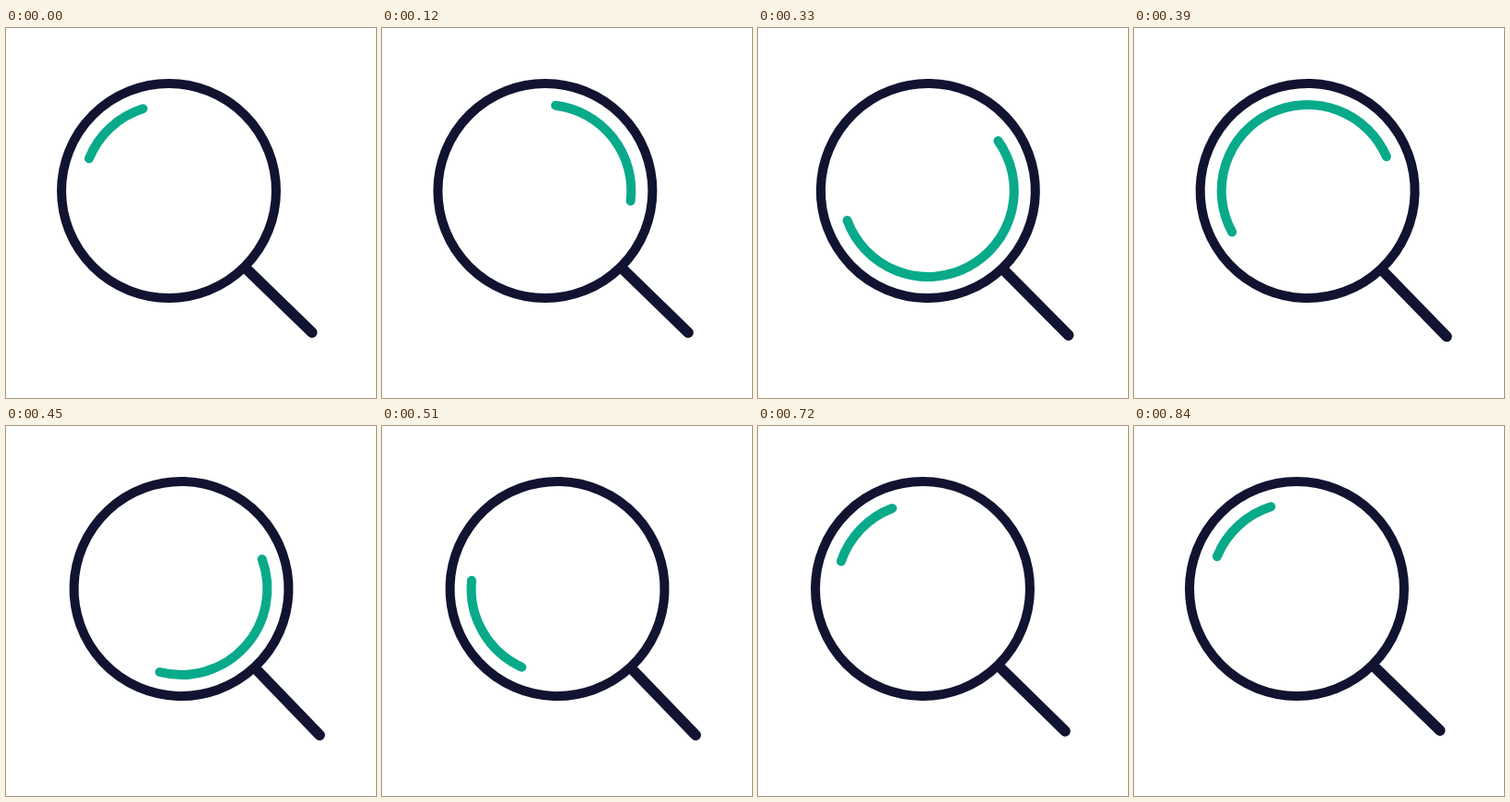
Recreate the animation shown at these times as an HTML page. Size 400x400 px, loop 870 ms.

```html
<!DOCTYPE html>
<html lang="en">
<head>
<meta charset="utf-8">
<title>Magnifying glass</title>
<style>
  html, body { margin: 0; width: 100%; height: 100%; overflow: hidden; background: #fff; }
  svg { display: block; width: 100vw; height: 100vh; }
  .ink { fill: none; stroke: #111330; stroke-width: 10; }
  .handle { stroke-width: 11.5; stroke-linecap: round; }
  .shine { fill: none; stroke: #08aa8a; stroke-width: 10; stroke-linecap: round; }
</style>
</head>
<body>
<svg viewBox="0 0 400 400">
  <g id="glass">
    <circle class="ink" r="116"/>
    <path class="ink handle" d="M83 83.5L154.8 153.2"/>
  </g>
  <path id="shine" class="shine"/>
</svg>
<script>
const LOOP = 870, STEP = 30, CX = 176, CY = 176, R = 93;
const glass = document.getElementById('glass');
const shine = document.getElementById('shine');

// Smooth monotone curve through [time, value] keys, at rest at both ends.
function track(keys) {
  const last = keys.length - 1;
  const slope = i => (keys[i + 1][1] - keys[i][1]) / (keys[i + 1][0] - keys[i][0]);
  const tangent = keys.map((key, i) => {
    if (i === 0 || i === last) return 0;
    const a = slope(i - 1), b = slope(i);
    if (a * b <= 0) return 0;
    const before = key[0] - keys[i - 1][0], after = keys[i + 1][0] - key[0];
    const mean = (a * after + b * before) / (before + after);
    const limit = 2.5 * Math.min(Math.abs(a), Math.abs(b));
    return Math.sign(mean) * Math.min(Math.abs(mean), limit);
  });
  return t => {
    if (t >= keys[last][0]) return keys[last][1];
    let i = 0;
    while (t >= keys[i + 1][0]) i++;
    const h = keys[i + 1][0] - keys[i][0], u = (t - keys[i][0]) / h, v = 1 - u;
    return keys[i][1] * v * v * (1 + 2 * u) + keys[i + 1][1] * u * u * (3 - 2 * u)
      + h * u * v * (tangent[i] * v - tangent[i + 1] * u);
  };
}

// The highlight makes three turns; its head runs ahead of its tail.
const tail = track([[0, 202], [120, 277], [240, 430], [390, 871.4], [510, 1194.4], [720, 1278.6], [840, 1282]]);
const head = track([[0, 252.5], [120, 366.8], [240, 598], [390, 1056.6], [510, 1265.5], [720, 1329.3], [840, 1332.5]]);
const sway = track([[0, 0], [120, 0.4], [240, 2], [390, 11.6], [480, 13.8], [510, 13.5], [720, 2], [840, 0]]);

function point(deg, cx) {
  const a = deg * Math.PI / 180;
  return `${(cx + R * Math.cos(a)).toFixed(2)} ${(CY + R * Math.sin(a)).toFixed(2)}`;
}

function draw(now) {
  const t = Math.floor(now % LOOP / STEP) * STEP;
  const dx = sway(t), cx = CX + dx, a = tail(t), b = head(t);
  glass.setAttribute('transform', `translate(${cx} ${CY}) rotate(${dx * 0.14})`);
  shine.setAttribute('d', `M${point(a, cx)}A${R} ${R} 0 ${b - a > 180 ? 1 : 0} 1 ${point(b, cx)}`);
}

function tick() {
  draw(performance.now());
  requestAnimationFrame(tick);
}
draw(0);
requestAnimationFrame(tick);
</script>
</body>
</html>
```
